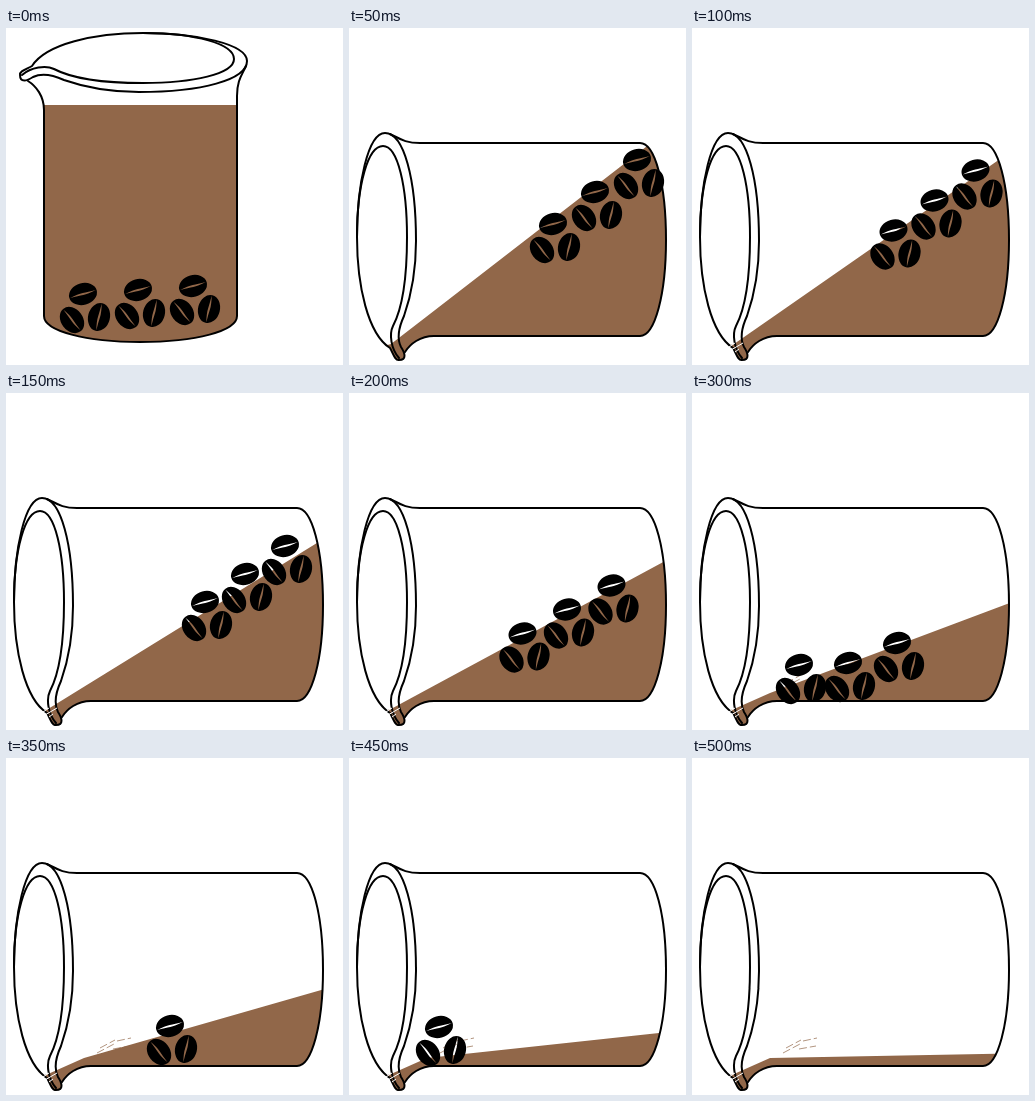
Write an HTML page that moves like this. It is 337 by 337 pixels and loops after 0.65 s.

```html
<!DOCTYPE html>
<html lang="en">
<head>
<meta charset="utf-8">
<title>Pouring beaker</title>
<style>
  html, body { margin: 0; width: 100%; height: 100%; overflow: hidden; background: #fff; }
  svg { display: block; width: 100vw; height: 100vh; }
  .line { fill: none; stroke: #000; stroke-width: 2; stroke-linecap: round; stroke-linejoin: round; }
  .drip { fill: none; stroke: #916749; stroke-width: .7; stroke-dasharray: 8 3; }
</style>
</head>
<body>
<svg viewBox="0 0 337 337">
  <defs>
    <path id="rim" d="M14 47C13 43 21 41 26 38C40 16 88 5 137 5C190 5 241 16 241 33C241 52 195 64 133 64C100 64 75 58 58 52C45 46 35 45 27 49C21 53 14 55 14 47Z"/>
    <path id="wall" d="M22 53C30 58 38 68 38 82V288C38 303 80 314 134 314C190 314 231 303 231 288V68C231 52 236 47 240 38"/>
    <path id="neck" d="M22 53L27 45L60 48V60H32Z"/>
    <path id="bean" fill-rule="evenodd" d="M-14.2 0A14.2 10.9 0 1 1 14.2 0A14.2 10.9 0 1 1 -14.2 0ZM-13.4 .6Q-5 -1.4 0 -1T13.4 -.6Q5 1.4 0 1T-13.4 .6Z"/>
    <g id="trio">
      <use href="#bean" transform="rotate(-15)"/>
      <use href="#bean" transform="translate(-11 26) rotate(53)"/>
      <use href="#bean" transform="translate(16 23) rotate(-76)"/>
    </g>
    <clipPath id="inside">
      <use class="glass" href="#rim"/>
      <use class="glass" href="#wall"/>
      <use class="glass" href="#neck"/>
    </clipPath>
  </defs>
  <g clip-path="url(#inside)"><path id="liquid" fill="#916749"/></g>
  <g class="glass line">
    <use href="#rim"/>
    <use href="#wall"/>
    <path d="M16 47C25 39 40 37 48 41C65 50 95 55 137 55C187 55 228 46 228 31C228 16 190 5 137 5"/>
  </g>
  <path id="shine" d="M37 319L43 315M39 322L51 315M43 324L47 321" fill="none" stroke="#fff"/>
  <path id="drip1" class="drip" d="M91 295L108 286M94 290L109 282"/>
  <path id="drip2" class="drip" d="M107 291L124 288M111 283L125 280"/>
  <use class="trio" href="#trio"/>
  <use class="trio" href="#trio"/>
  <use class="trio" href="#trio"/>
</svg>
<script>
  const LOOP = 650, STEP = 50, LAST = 10;
  const TILT = 'matrix(0 -1 1 0 3 346)';
  const LIP = { x: 42, y: 316 }, KNEE = 78, EDGE = 320;
  const $ = id => document.getElementById(id);
  const glass = document.querySelectorAll('.glass');
  const trios = document.querySelectorAll('.trio');

  // [step, x, y]: place of the rightmost trio, and the offset to each next one
  const lead = [[0, 187, 258], [1, 288, 132], [3, 279, 153], [5, 246, 232], [7, 164, 268], [9, 90, 269]];
  const gap = [[0, -55, 4], [1, -42, 32], [3, -40, 28], [5, -49, 20]];

  function at(keys, k) {
    const i = keys.findIndex(key => key[0] >= k);
    const b = keys.at(i), a = keys[Math.max(0, i - 1)];
    if (i <= 0) return b.slice(1);
    const u = (k - a[0]) / (b[0] - a[0]);
    return [1, 2].map(n => a[n] + (b[n] - a[n]) * u);
  }

  function show(el, on) {
    el.setAttribute('visibility', on ? 'visible' : 'hidden');
  }

  // The surface sinks evenly at the far end and hinges on the lip.
  function liquid(k) {
    if (!k) return 'M0 77H337V337H0Z';
    const far = 79.5 + 21.6 * k;
    const line = LIP.y + (far - LIP.y) * (KNEE - LIP.x) / (EDGE - LIP.x);
    return `M35 318L${LIP.x} ${LIP.y}L${KNEE} ${Math.min(300, line)}L${EDGE} ${far}V337H35Z`;
  }

  function draw(ms) {
    const k = Math.min(LAST, Math.floor((ms % LOOP) / STEP));
    glass.forEach(el => el.setAttribute('transform', k ? TILT : ''));
    $('liquid').setAttribute('d', liquid(k));

    const [x, y] = at(lead, k), [dx, dy] = at(gap, k);
    trios.forEach((el, i) => {
      el.setAttribute('transform', `translate(${x + i * dx} ${Math.min(272, y + i * dy)})`);
      show(el, k < (i ? 7 : LAST));
    });
    show($('shine'), k > 1);
    show($('drip1'), k > 4);
    show($('drip2'), k > 6);
  }

  const start = performance.now();
  function tick() {
    draw(performance.now() - start);
    requestAnimationFrame(tick);
  }
  tick();
</script>
</body>
</html>
```
